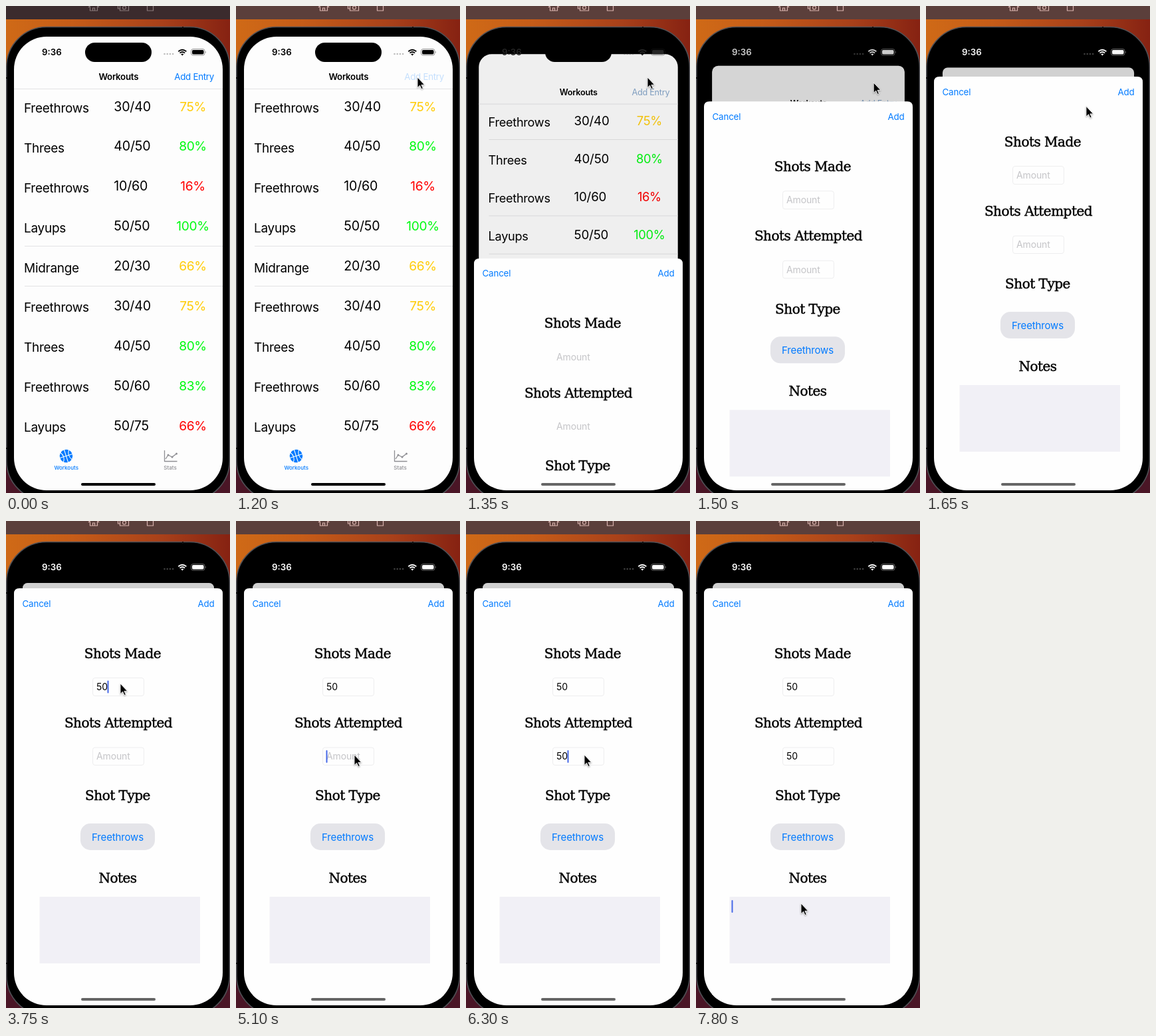
Animation, 337 px wide and 731 px high, one loop 8000 ms. Source, as an HTML page:

```html
<!DOCTYPE html>
<html lang="en">
<head>
<meta charset="utf-8">
<title>Workouts</title>
<style>
html, body { margin: 0; width: 100%; height: 100%; overflow: hidden; background: #000; }
svg { display: block; width: 337px; height: 731px; font-family: Inter, Roboto, sans-serif; }
text { white-space: pre; }
.ui { font-size: 13.3px; letter-spacing: -.01em; }
.bold { font-weight: 600; letter-spacing: -.02em; }
.blue { fill: #007aff; }
.mid { text-anchor: middle; }
.end { text-anchor: end; }
.kind { font-size: 19px; letter-spacing: -.015em; }
.score { font-size: 19.6px; letter-spacing: -.01em; }
.percent { font-size: 19.2px; letter-spacing: -.02em; }
.tab { font-size: 8px; font-weight: 500; }
.head { font: 20px "DejaVu Serif", serif; letter-spacing: -.025em; text-anchor: middle; stroke: #000; stroke-width: .45; }
.field { fill: #fefefe; stroke: #eeeeef; }
.value { font-size: 14px; letter-spacing: -.01em; }
.line { stroke: #e3e3e5; }
#cursor { filter: drop-shadow(0 1px 1px #0005); }
</style>
</head>
<body>
<svg viewBox="0 0 337 731">
  <defs>
    <linearGradient id="wall">
      <stop stop-color="#cf6a17"/><stop offset=".3" stop-color="#c65c18"/>
      <stop offset=".7" stop-color="#a8401a"/><stop offset="1" stop-color="#862212"/>
    </linearGradient>
    <linearGradient id="dusk" x2="0" y2="1">
      <stop offset=".1" stop-color="#4a1626" stop-opacity="0"/><stop offset=".8" stop-color="#4a1626"/>
    </linearGradient>
    <clipPath id="screen"><rect x="12" y="46" width="314" height="681" rx="49"/></clipPath>
  </defs>

  <rect width="337" height="731" fill="url(#wall)"/>
  <rect width="337" height="731" fill="url(#dusk)"/>
  <rect id="bar" width="337" height="20"/>
  <g id="tools" fill="none" stroke-width="1.2">
    <path d="M124 2l8-7 8 7M126.500 0v7h11V0M130.500 7V3h3v4"/>
    <path d="M171.500-3v10h13v-10M168.500-3v7h3"/><circle cx="178" cy="2.500" r="2.500"/>
    <path d="M212.500-3v10h9v-10"/>
  </g>

  <rect x=".8" y="31.500" width="335.600" height="711" rx="60" stroke="#505055" stroke-width="1.600"/>
  <path d="M0 108h2M0 664h2M266 31v3" stroke="#111" stroke-width="2"/>

  <g clip-path="url(#screen)">
    <g id="list">
      <rect class="card" x="12" y="46" width="314" height="681" fill="#fdfdfd"/>
      <path class="line" d="M12 124.500h314"/>
      <text class="ui bold mid" x="169.300" y="111.200">Workouts</text>
      <text id="entry" class="ui end" x="313" y="111.200" style="letter-spacing:-.02em">Add Entry</text>
      <g id="rows"></g>
      <path class="line" d="M28 360.500h298M28 420.500h298"/>
      <path id="moreLines" class="line" d="M28 180.500h298M28 300.500h298"/>
      <g transform="translate(90.500 675.500) rotate(-18)">
        <circle class="blue" r="9.700"/>
        <path d="M-10 0H10M0-10V10M-7-8Q-1 0-7 8M7-8Q1 0 7 8" fill="none" stroke="#fdfdfd" stroke-width="1.100"/>
      </g>
      <text class="tab blue mid" x="90.700" y="696">Workouts</text>
      <g fill="none" stroke="#8e8e93" stroke-width="1.300" stroke-linejoin="round">
        <path d="M238.500 667v16.500h19M240 680l4-6 6 3 6.500-5"/>
        <path d="M244 674h0M250 677h0M256.500 672h0" stroke-width="3" stroke-linecap="round"/>
      </g>
      <text class="tab mid" x="247" y="696" fill="#8e8e93">Stats</text>
      <rect id="dim" class="card" x="12" y="46" width="314" height="681"/>
    </g>
    <rect x="119" y="55" width="100" height="29" rx="14.500"/>
    <g id="status">
      <text class="ui bold" x="54" y="74.300" style="letter-spacing:0">9:36</text>
      <path d="M238.500 72h0M242.700 72h0M246.900 72h0M251.100 72h0" stroke="currentColor" stroke-width="2.600" stroke-linecap="round" opacity=".25"/>
      <path d="M259.300 68.300q6-5.300 12 0M261.500 70.600q3.800-3.300 7.600 0" fill="none" stroke="currentColor" stroke-width="1.900"/>
      <path d="M263.200 72.300q2.100-1.700 4.200 0L265.300 74.500z"/>
      <rect x="278.500" y="64.500" width="20.500" height="9.500" rx="3" fill="none" stroke="currentColor" opacity=".4"/>
      <rect x="280" y="66" width="17.500" height="6.500" rx="1.700"/>
      <path d="M300 67.700q1.800 1.500 0 3z" opacity=".5"/>
    </g>

    <g id="sheet">
      <path d="M12 760V109q0-8 8-8H318q8 0 8 8V760z" fill="#fefefe"/>
      <text class="ui blue" x="24.500" y="128.500">Cancel</text>
      <text class="ui blue end" x="313.500" y="128.500">Add</text>
      <text class="head" x="175.500" y="205.500">Shots Made</text>
      <rect class="field" x="130.500" y="235.500" width="77" height="27" rx="3.500"/>
      <text class="value" x="136" y="253.800"></text>
      <text class="head" x="169" y="310">Shots Attempted</text>
      <rect class="field" x="130.500" y="340" width="77" height="26.500" rx="3.500"/>
      <text class="value" x="136" y="358.300"></text>
      <text class="head" x="168" y="419.300">Shot Type</text>
      <rect x="112" y="454" width="112" height="40" rx="15" fill="#e4e4e9"/>
      <text class="blue mid" x="168" y="479.600" font-size="15" letter-spacing="-.15">Freethrows</text>
      <text class="head" x="168" y="543">Notes</text>
      <rect x="50.500" y="564" width="241.500" height="100" fill="#f1f0f6"/>
      <rect id="caret" width="2" height="19" rx="1" fill="#4668e8"/>
    </g>
    <rect id="home" x="113" y="716" width="112" height="4" rx="2"/>
  </g>
  <path id="cursor" d="M0 0V15.500L3.600 12.200 6 17.600 8.300 16.600 5.900 11.400H10.700Z" stroke="#fff" stroke-width=".9"/>
</svg>

<script>
const LOOP = 8000, STEP = 150;
const $ = id => document.getElementById(id);
const all = selector => document.querySelectorAll(selector);
const set = (id, attrs) => Object.entries(attrs).forEach(([k, v]) => $(id).setAttribute(k, v));

const YELLOW = '#ffcc0a', GREEN = '#00fa10', RED = '#ff0000';
const workouts = [
  ['Freethrows', '30/40', '75%', YELLOW], ['Threes', '40/50', '80%', GREEN],
  ['Freethrows', '10/60', '16%', RED], ['Layups', '50/50', '100%', GREEN],
  ['Midrange', '20/30', '66%', YELLOW], ['Freethrows', '30/40', '75%', YELLOW],
  ['Threes', '40/50', '80%', GREEN], ['Freethrows', '50/60', '83%', GREEN],
  ['Layups', '50/75', '66%', RED]
];
$('rows').innerHTML = workouts.map(([kind, score, percent, color], i) => {
  const y = 159.7 + i * 59.95;
  return `<text class="kind" x="27" y="${y}">${kind}</text>
    <text class="score" x="162.300" y="${y - 2.2}">${score}</text>
    <text class="percent mid" x="281" y="${y - 2.2}" fill="${color}">${percent}</text>`;
}).join('');

// time, x, y of the pointer
const pointer = [
  [300, 275, 121], [600, 273, 107], [1350, 273, 107], [2100, 172, 244],
  [4200, 172, 244], [4800, 178, 351], [6750, 178, 351], [7500, 158, 574]
];
// time, focused input, characters typed
const typing = [
  [2550, 0, 0], [3450, 0, 1], [3750, 0, 2],
  [5100, 1, 0], [6000, 1, 1], [6300, 1, 2], [7800, 2, 0]
];
const caretHome = [[135.5, 239.5], [135.5, 344], [53.5, 569]];
const inputs = all('.value'), fields = all('.field'), cards = all('.card');

const smooth = u => u * u * u * (u * (6 * u - 15) + 10);

function pointerAt(t) {
  const next = pointer.findIndex(key => key[0] > t);
  if (next < 0) return pointer.at(-1).slice(1);
  const [t0, x0, y0] = pointer[next - 1], [t1, x1, y1] = pointer[next];
  const u = smooth((t - t0) / (t1 - t0));
  return [x0 + (x1 - x0) * u, y0 + (y1 - y0) * u];
}

// critically damped spring from 0 to 1
function sheetProgress(t) {
  const x = Math.max(0, t - 1238) * 0.01673;
  return 1 - (1 + x) * Math.exp(-x);
}

function drawForm(t) {
  const typed = [0, 0, 0];
  let focus;
  for (const event of typing) {
    if (event[0] > t) break;
    focus = event;
    typed[event[1]] = event[2];
  }
  inputs.forEach((input, i) => {
    input.textContent = typed[i] ? '50'.slice(0, typed[i]) : 'Amount';
    input.setAttribute('fill', typed[i] ? '#000' : '#c5c5c8');
  });
  const visible = focus && (t - focus[0]) % 900 < 600;
  set('caret', { visibility: visible ? 'visible' : 'hidden' });
  if (visible) {
    const [x, y] = caretHome[focus[1]];
    set('caret', { x: x + focus[2] * 8.5, y });
  }
}

function draw(t) {
  const p = sheetProgress(t), active = t >= 1200, presenting = p > 0;
  set('bar', { fill: active ? '#5b3f3b' : '#3b2b2d' });
  set('tools', { stroke: active ? '#d9b3ae' : '#8a7a7b' });

  const scale = 1 - 0.083 * p;
  set('list', { transform: `translate(${169 * (1 - scale)} ${50.8 * p}) scale(${scale})` });
  cards.forEach(card => card.setAttribute('rx', 36 - 28 * p));
  set('dim', { opacity: 0.18 * p * p });
  set('moreLines', { visibility: presenting ? 'visible' : 'hidden' });
  set('entry', {
    fill: presenting ? '#86a6ca' : '#007aff',
    opacity: active && !presenting ? 0.22 : 1
  });

  const gray = Math.round(255 * p ** 3.3), tint = `rgb(${gray},${gray},${gray})`;
  set('status', { fill: tint, color: tint });
  set('sheet', { transform: `translate(0 ${630 * (1 - p)})` });
  fields.forEach(field => field.setAttribute('opacity', p > 0.6 ? 1 : 0));
  set('home', { fill: presenting ? '#666' : '#000' });
  drawForm(t);

  const shown = t >= 300;
  set('cursor', { visibility: shown ? 'visible' : 'hidden' });
  if (shown) set('cursor', { transform: `translate(${pointerAt(t)})` });
}

// the screen refreshes in fixed steps
function tick() {
  draw(Math.floor(performance.now() % LOOP / STEP) * STEP);
  requestAnimationFrame(tick);
}
tick();
</script>
</body>
</html>
```
